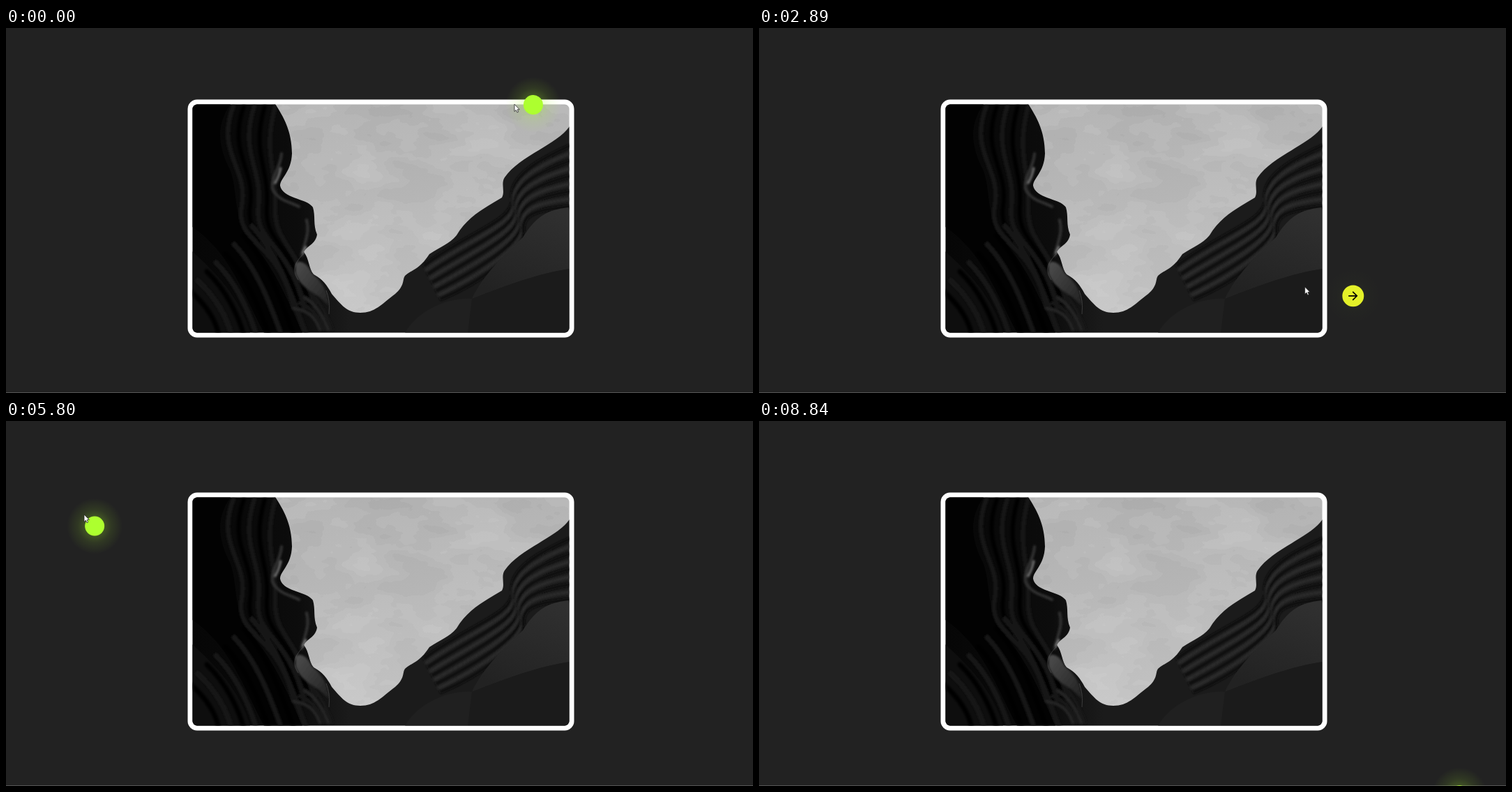
Animation of 1071 by 523 pixels, one loop 8.86 s. Source, as an HTML page:

```html
<!DOCTYPE html>
<html lang="en">
<head>
<meta charset="utf-8">
<title>Cursor follower</title>
<style>
  html, body { margin: 0; width: 100%; height: 100%; overflow: hidden; background: #222; }
  svg { display: block; width: 1071px; height: 523px; }
  .soft path { fill: none; stroke-linecap: round; }
</style>
</head>
<body>
<svg viewBox="0 0 1071 523">
  <defs>
    <clipPath id="inner"><rect x="267.5" y="109.5" width="540" height="327" rx="6.5"/></clipPath>
    <linearGradient id="sky" x1="0" y1="0" x2=".35" y2="1">
      <stop offset="0" stop-color="#a9a9a9"/>
      <stop offset=".5" stop-color="#b4b4b4"/>
      <stop offset="1" stop-color="#c0c0c0"/>
    </linearGradient>
    <linearGradient id="rock" gradientUnits="userSpaceOnUse" x1="267" y1="0" x2="808" y2="0">
      <stop offset="0" stop-color="#060606"/>
      <stop offset=".28" stop-color="#0c0c0c"/>
      <stop offset=".42" stop-color="#1b1b1b"/>
      <stop offset="1" stop-color="#1b1b1b"/>
    </linearGradient>
    <linearGradient id="plane" x1=".8" y1="0" x2=".4" y2="1">
      <stop offset="0" stop-color="#303030"/>
      <stop offset="1" stop-color="#222"/>
    </linearGradient>
    <linearGradient id="facet" x1="0" y1="0" x2="1" y2="1">
      <stop offset="0" stop-color="#4c4c4c"/>
      <stop offset="1" stop-color="#222"/>
    </linearGradient>
    <radialGradient id="halo">
      <stop offset=".35" stop-color="#adff2f" stop-opacity=".22"/>
      <stop offset=".6" stop-color="#adff2f" stop-opacity=".1"/>
      <stop offset="1" stop-color="#adff2f" stop-opacity="0"/>
    </radialGradient>
    <filter id="blur"><feGaussianBlur stdDeviation="1.8"/></filter>
    <filter id="clouds" x="0" y="0" width="1" height="1">
      <feTurbulence type="fractalNoise" baseFrequency=".011 .02" numOctaves="4" seed="7"/>
      <feColorMatrix values="0 0 0 0 .8  0 0 0 0 .8  0 0 0 0 .8  1 0 0 0 0"/>
      <feComponentTransfer><feFuncA type="discrete" tableValues="0 0 0 .08 .16 .24 .3 .3"/></feComponentTransfer>
    </filter>
  </defs>

  <rect width="1071" height="523" fill="#222"/>
  <rect y="522" width="1071" height="1" fill="#555"/>
  <rect x="260.5" y="102.5" width="554" height="341" rx="13.5" fill="#fff"/>

  <g clip-path="url(#inner)">
    <rect x="267" y="109" width="541" height="328" fill="url(#sky)"/>
    <rect x="267" y="109" width="541" height="328" filter="url(#clouds)"/>

    <path id="ridge" fill="url(#rock)" d="M267 109H386C397 126 410 147 410 180C409 207 393 215 393 226
      C397 245 432 244 440 257C444 270 440 282 446 296C444 310 430 313 427 321C435 331 434 345 441 353
      C454 360 460 368 467 381C481 397 489 408 508 408C529 408 538 396 558 381C572 369 568 361 572 355
      C582 346 592 347 607 324C622 314 636 309 646 297C662 270 686 258 711 243C716 234 709 223 715 214
      C735 184 790 167 808 141V437H267Z"/>
    <clipPath id="land"><use href="#ridge"/></clipPath>

    <g clip-path="url(#land)">
      <path fill="#020202" d="M267 109H322C300 140 304 170 322 205C332 235 326 265 345 300
        C380 335 400 380 425 437H370C340 380 320 320 267 285Z"/>
      <path fill="#0e0e0e" d="M267 320C300 350 335 385 350 437H267Z"/>
      <g id="folds" class="soft" filter="url(#blur)"></g>

      <path fill="url(#plane)" d="M808 257C780 260 762 266 741 300C715 325 685 352 668 388C710 372 760 352 808 345Z"/>
      <path fill="#1b1b1b" d="M808 345C760 352 710 372 668 388L662 437H808Z"/>
      <path fill="#202020" d="M572 437C590 405 632 386 668 388L662 437Z"/>

      <g class="soft" filter="url(#blur)">
        <path stroke="#303030" stroke-width="4" d="M395 180C394 200 380 212 382 230C390 248 408 249 420 256M431 275C436 295 428 306 424 326"/>
        <path stroke="#777" stroke-width="3" d="M394 201Q391 214 386 222M430 314L426 322"/>
      </g>
      <path fill="url(#facet)" filter="url(#blur)" d="M415 338C422 330 434 340 438 351C452 362 463 378 462 398C450 380 425 378 415 352Z"/>
      <path fill="none" stroke="#777" stroke-opacity=".4" d="M427 323C410 340 412 350 419 361M459 376Q465 390 463 410"/>
    </g>
  </g>

  <g id="ball">
    <circle id="glow" r="40" fill="url(#halo)"/>
    <circle id="disc" r="14"/>
    <path id="arrow" d="M0-8L-1.41-6.59L4.17-1H-8V1H4.17L-1.41 6.59L0 8L8 0Z"/>
  </g>
  <path id="tip" d="M0 0V10.4L2.4 8.3L4 11.8L5.7 11L4.2 7.6H7.3Z" fill="#fff" stroke="#222" stroke-width=".8"/>
</svg>

<script>
const LOOP = 8860, FADE = 400, LAG = 160, STEP = 10;
const el = id => document.getElementById(id);

// Turning points of the pointer: time, x, y
const path = [
  [0, 729, 109], [450, 703, 200], [940, 758, 212], [1340, 786, 151], [1860, 935, 144],
  [2200, 960, 235], [2650, 872, 384], [2890, 783, 371], [3680, 523, 270], [4180, 400, 308],
  [4440, 333, 227], [4590, 298, 148], [4820, 215, 130], [5250, 115, 165], [5560, 112, 134],
  [6190, 112, 134], [6400, 99, 190], [6750, 225, 300], [7030, 494, 258], [7250, 556, 226],
  [7470, 576, 233], [7960, 826, 402], [8680, 998, 528]
];

// Harmonic mean of the neighbouring speeds: smooth, no overshoot
function slope(i, axis) {
  const rate = k => (path[k + 1][axis] - path[k][axis]) / (path[k + 1][0] - path[k][0]);
  if (i === 0) return rate(0);
  if (i === path.length - 1) return 0;
  const a = rate(i - 1), b = rate(i);
  return a * b <= 0 ? 0 : 2 * a * b / (a + b);
}

function pointer(t) {
  const next = path.findIndex(p => p[0] > t);
  if (next < 0) return path.at(-1).slice(1);
  const a = path[next - 1], b = path[next];
  const span = b[0] - a[0], u = (t - a[0]) / span, v = 1 - u;
  return [1, 2].map(k =>
    v * v * (1 + 2 * u) * a[k] + u * u * (3 - 2 * u) * b[k] +
    span * u * v * (v * slope(next - 1, k) - u * slope(next, k)));
}

const mix = (a, b, k) => a.map((v, i) => v + (b[i] - v) * k);

// The ball eases towards the pointer; its trail is worked out once
const trail = [[756, 110]];
for (let t = STEP; t <= LOOP + STEP; t += STEP) {
  const goal = pointer(t - STEP / 2).map(v => v + 14);
  trail.push(mix(trail.at(-1), goal, 1 - Math.exp(-STEP / LAG)));
}
function follower(t) {
  const i = Math.floor(t / STEP);
  return mix(trail[i], trail[i + 1], t / STEP - i);
}

const inside = ([x, y]) => x > 261 && x < 814 && y > 102 && y < 444;

// Moments when the pointer enters or leaves the card
const flips = [];
for (let t = 0, was = false; t < LOOP; t += 5) {
  const on = inside(pointer(t));
  if (on !== was) flips.push({ t, on });
  was = on;
}

function hover(t) {
  const flip = flips.findLast(f => f.t <= t);
  const u = Math.min(1, (t - flip.t) / FADE);
  const s = u * u * (3 - 2 * u);
  return flip.on ? s : 1 - s;
}

const LIME = [173, 255, 47, 1], YELLOW = [240, 238, 40, 1], GLASS = [255, 255, 255, .6];
const tint = h => h < .13 ? mix(LIME, YELLOW, h / .13) : mix(YELLOW, GLASS, (h - .13) / .87);

// Rock strata: one curve shifted step by step, light and dark in turn
function strata(count, width, tones, curve) {
  for (let k = 0; k < count; k++) {
    el('folds').insertAdjacentHTML('beforeend',
      `<path d="${curve(k)}" stroke="${tones[k % 2]}" stroke-width="${width}"/>`);
  }
}
strata(9, 5, ['#101010', '#2b2b2b'], k =>
  `M810 ${168 + k * 11}C${765 - k} ${188 + k * 9} ${722 + k * 2} ${212 + k * 7} ${726 + k * 2} ${244 + k * 6}` +
  `S${665 + k * 2} ${292 + k * 9} ${600 + k * 3} ${340 + k * 6}`);
strata(5, 6, ['#171717', '#050505'], k =>
  `M${326 + k * 15} 112C${300 + k * 17} 180 ${348 + k * 10} 200 ${338 + k * 12} 255` +
  `S${392 + k * 6} 305 ${412 + k * 8} 400`);
strata(8, 7, ['#060606', '#151515'], k =>
  `M${262 + k * 13} ${375 - k * 13}C${285 + k * 16} ${395 - k * 9} ${300 + k * 17} 415 ${305 + k * 18} 440`);
strata(4, 4, ['#262626', '#141414'], k =>
  `M${412 + k * 8} ${402 - k * 8}Q${440 + k * 5} ${404 - k * 2} ${450 + k * 6} 432`);

const ball = el('ball'), glow = el('glow'), disc = el('disc'), arrow = el('arrow'), tip = el('tip');

function draw(now) {
  const t = now % LOOP, h = hover(t), size = 1 + h;
  ball.setAttribute('transform', `translate(${follower(t)})`);
  tip.setAttribute('transform', `translate(${pointer(t)})`);
  glow.setAttribute('opacity', Math.max(0, 1 - h / .12));
  disc.setAttribute('r', 14 * size);
  disc.setAttribute('fill', `rgba(${tint(h)})`);
  arrow.setAttribute('transform', `scale(${size * .75})`);
  arrow.setAttribute('opacity', Math.min(1, h / .1));
}

const start = performance.now();
function tick() {
  draw(performance.now() - start);
  requestAnimationFrame(tick);
}
tick();
</script>
</body>
</html>
```
